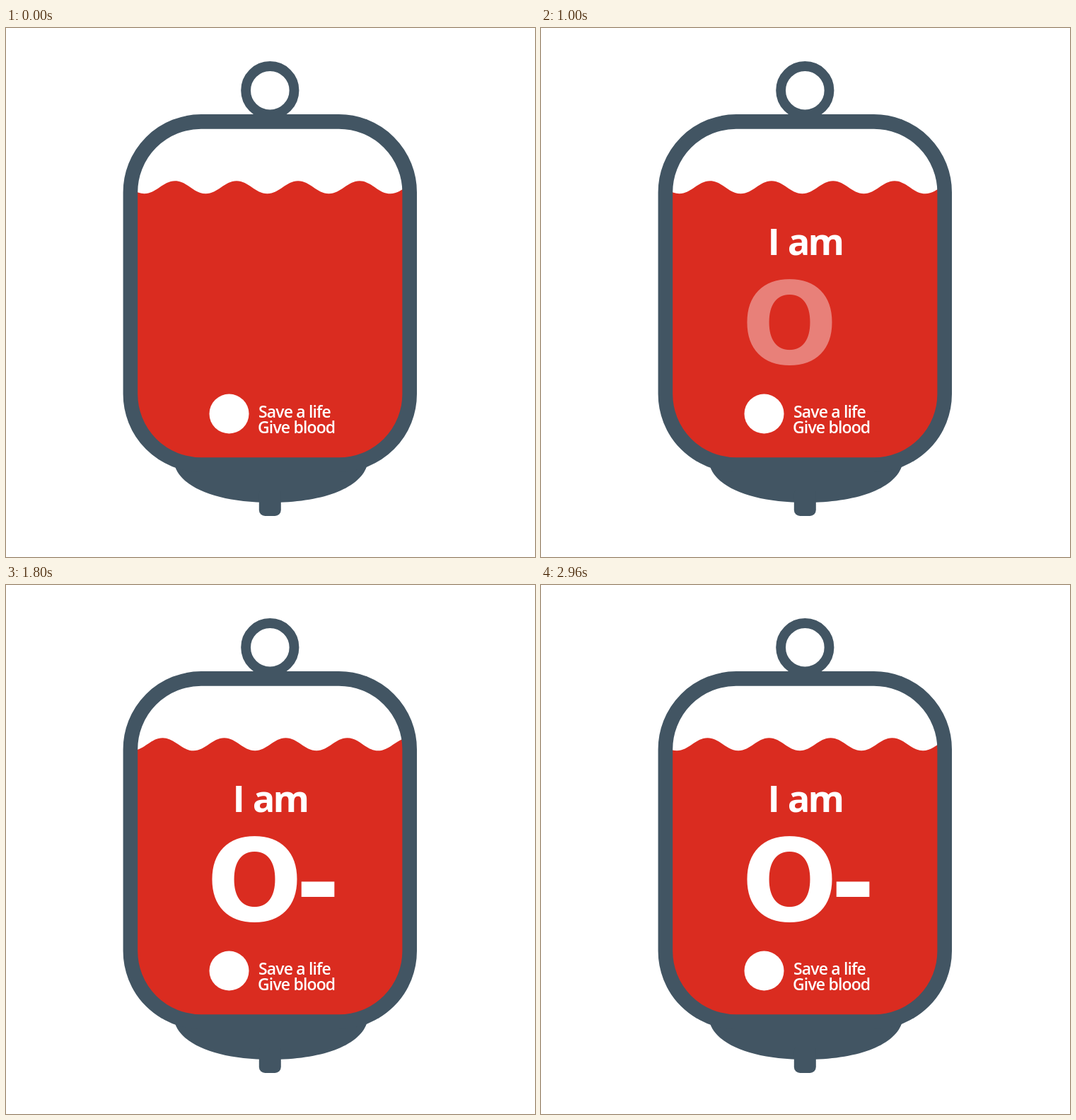
An HTML page that plays this animation: 748x748 px, repeating every 3000 ms.

```html
<!DOCTYPE html>
<html lang="en">
<head>
<meta charset="utf-8">
<title>Blood bag</title>
<style>
  html, body { margin: 0; width: 100%; height: 100%; overflow: hidden; background: #fff; }
  svg { display: block; width: 100vw; height: 100vh; }
  text { fill: #fff; white-space: pre; }
  .intro { font: 700 52.5px "Open Sans", "Noto Sans", sans-serif; letter-spacing: -3px; }
  .type { font: 700 160px "DejaVu Sans", sans-serif; text-anchor: middle; }
  .sign { font-size: 152px; }
  .slogan { font: 600 23px "Open Sans", "Noto Sans", sans-serif; letter-spacing: -.85px; }
</style>
</head>
<body>
<svg viewBox="0 0 748 748">
  <defs>
    <clipPath id="inside"><rect x="180" y="137" width="386.5" height="476" rx="96"/></clipPath>
  </defs>
  <g clip-path="url(#inside)"><path id="wave" fill="#da2c20"/></g>
  <g fill="#425563">
    <path d="M238 617C247 651 301 671 374 671S502 651 511 617Z"/>
    <rect x="357.8" y="650" width="31" height="40" rx="8.5"/>
  </g>
  <g fill="none" stroke="#425563">
    <circle cx="373.3" cy="88.2" r="34.2" stroke-width="13.8"/>
    <rect x="175.9" y="132.4" width="394.8" height="485.2" rx="100" stroke-width="20.6"/>
  </g>
  <text id="i" class="intro" x="320.6" y="321.2">I</text>
  <text id="am" class="intro" x="348.8" y="321.2">am</text>
  <text id="group" class="type" x="351.6" y="475">O</text>
  <text id="sign" class="type sign" x="441" y="474.2">-</text>
  <circle cx="315.5" cy="545.5" r="28" fill="#fff"/>
  <text class="slogan" x="357" y="550.5">Save a life</text>
  <text class="slogan" x="356" y="572.5">Give blood</text>
</svg>
<script>
  const LOOP = 3000, STEP = 40;
  const WAVELENGTH = 87, CREST = 216.3, TROUGH = 234.3;
  const FADE = 400;
  const fadeStarts = { i: 0, am: 320, group: 840, sign: 1360 };
  const byId = id => document.getElementById(id);
  const clamp = v => Math.max(0, Math.min(1, v));

  function wavePath(shift) {
    const half = WAVELENGTH / 2, handle = 17;
    let x = 65 + shift % WAVELENGTH;
    let y = CREST;
    let d = `M${x} ${y}`;
    while (x < 620) {
      const nextY = y === CREST ? TROUGH : CREST;
      d += `C${x + handle} ${y} ${x + half - handle} ${nextY} ${x + half} ${nextY}`;
      x += half;
      y = nextY;
    }
    return d + "V620H60Z";
  }

  function render(time) {
    const t = Math.floor((time % LOOP) / STEP) * STEP;
    byId("wave").setAttribute("d", wavePath(t / LOOP * 3 * WAVELENGTH));
    for (const id in fadeStarts) {
      byId(id).setAttribute("opacity", clamp((t - fadeStarts[id]) / FADE));
    }
  }

  const start = performance.now();
  function tick() {
    render(performance.now() - start);
    requestAnimationFrame(tick);
  }
  tick();
</script>
</body>
</html>
```
